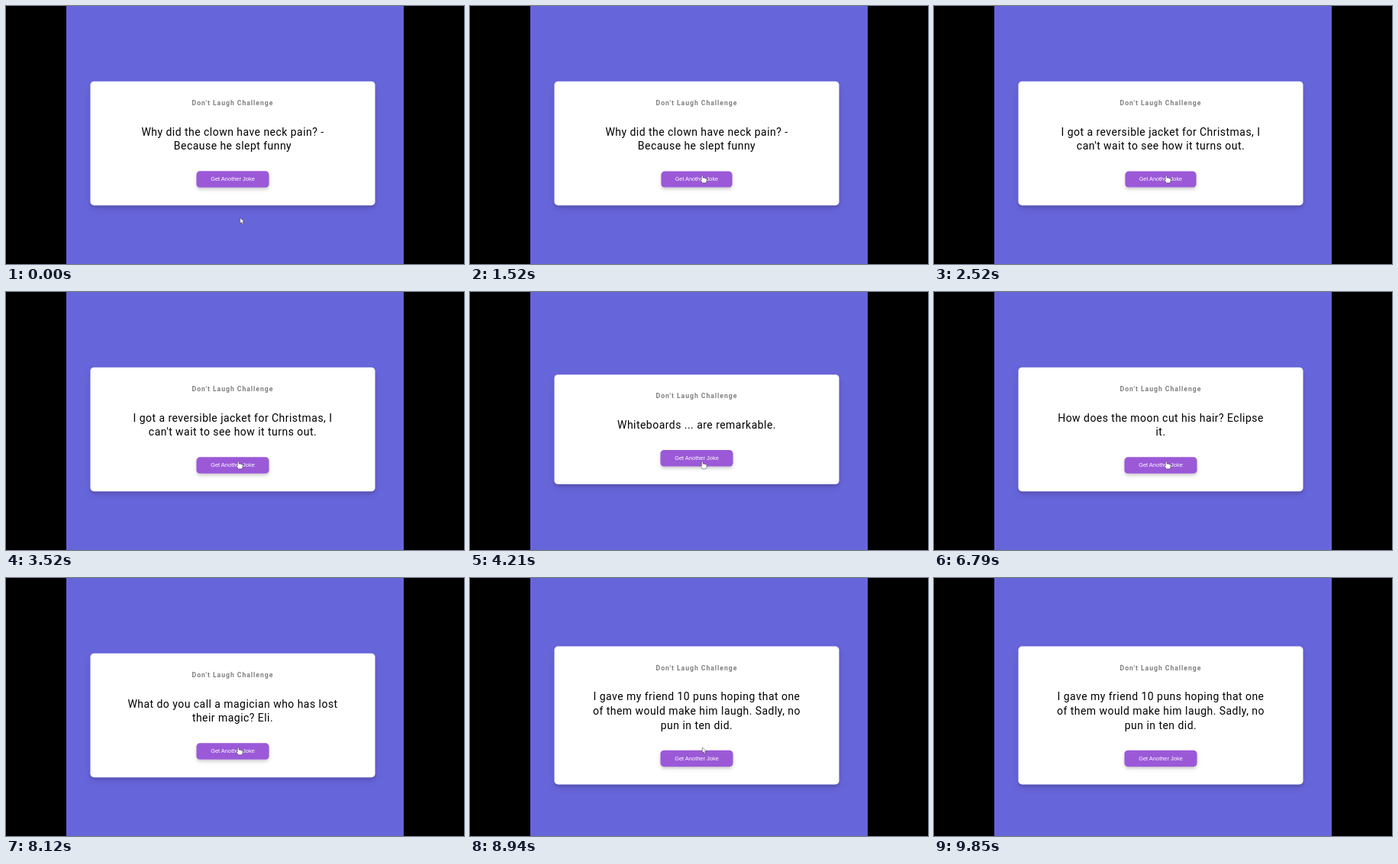
An HTML page for the animation above (9.88 s loop, 600 px wide and 338 px high).

```html
<!DOCTYPE html>
<html lang="en">
<head>
<meta charset="utf-8">
<title>Joke card</title>
<style>
  html, body { margin: 0; width: 100%; height: 100%; overflow: hidden; background: #000; }
  #page { position: absolute; left: 79px; top: 0; width: 442px; height: 338px; overflow: hidden; background: #6765da; }
  #card {
    position: absolute; left: 217.6px; top: 179.5px; width: 800px; padding: 50px 20px; box-sizing: border-box;
    transform: translate(-50%, -50%) scale(.4663);
    background: #fff; border-radius: 10px; text-align: center; font-family: Roboto, sans-serif;
    box-shadow: 0 10px 20px rgba(0, 0, 0, .1), 0 6px 6px rgba(0, 0, 0, .1);
  }
  h3 { margin: 0; font-size: 18.72px; line-height: 22px; letter-spacing: 2px; opacity: .5; }
  #joke { margin: 50px 0; font-size: 30px; line-height: 40px; letter-spacing: 1px; white-space: pre; }
  #button {
    display: inline-block; vertical-align: top; padding: 14px 40px; border-radius: 10px;
    background: #9b59d8; color: #fff; font: 16px/18px "Liberation Sans", Arial, sans-serif;
    box-shadow: 0 5px 15px rgba(0, 0, 0, .1), 0 6px 6px rgba(0, 0, 0, .1);
  }
  #cursor { position: absolute; left: 0; top: 0; overflow: visible; }
</style>
</head>
<body>
<div id="page">
  <div id="card">
    <h3>Don't Laugh Challenge</h3>
    <div id="joke"></div>
    <div id="button">Get Another Joke</div>
  </div>
</div>
<svg id="cursor" width="12" height="12" fill="#fff" stroke="#222" stroke-linejoin="round">
  <path id="arrow" transform="scale(.466)" d="M0 0V16L4 12.5L6.5 18.5L9.5 17.2L7 11.5H12Z"/>
  <path id="hand" transform="scale(.466)" d="M-2 1Q0-1 2 1V7Q4 5.500 6 7.500Q8 6.500 9.500 8.500Q12 7.500 12.500 10V15Q12 18 10 21H0Q-2 17-6 13Q-6 10-2 13Z"/>
</svg>
<script>
const LOOP = 9880;
const PRESS_LENGTH = 130;
const presses = [1440, 2440, 3690, 5130, 7380, 8350];
const jokes = [
  [0, "Why did the clown have neck pain? -\nBecause he slept funny"],
  [1850, "I got a reversible jacket for Christmas, I\ncan't wait to see how it turns out."],
  [4090, "Whiteboards ... are remarkable."],
  [5500, "How does the moon cut his hair? Eclipse\nit."],
  [7750, "What do you call a magician who has lost\ntheir magic? Eli."],
  [8700, "I gave my friend 10 puns hoping that one\nof them would make him laugh. Sadly, no\npun in ten did."]
];
const [joke, button, cursor, arrow, hand] =
  ["joke", "button", "cursor", "arrow", "hand"].map(id => document.getElementById(id));

const progress = (t, start, end) => Math.min(1, Math.max(0, (t - start) / (end - start)));
const smooth = p => p * p * (3 - 2 * p);

function draw(t) {
  const text = jokes.findLast(([start]) => t >= start)[1];
  if (joke.textContent !== text) joke.textContent = text;

  const pressed = presses.some(start => t >= start && t < start + PRESS_LENGTH);
  button.style.transform = pressed ? "scale(.98)" : "none";

  const enter = smooth(progress(t, 250, 950));
  const leave = progress(t, 9250, 9550) ** 2;
  const x = 306.7 - 2.4 * enter + 12 * leave;
  const y = 277.5 - 55.5 * enter - 160 * leave;
  const box = button.getBoundingClientRect();
  const hovering = y >= box.top && y <= box.bottom;
  cursor.style.transform = `translate(${x}px, ${y}px)`;
  cursor.style.display = leave < 1 ? "block" : "none";
  hand.style.display = hovering ? "block" : "none";
  arrow.style.display = hovering ? "none" : "block";
}

function tick() {
  draw(performance.now() % LOOP);
  requestAnimationFrame(tick);
}
tick();
</script>
</body>
</html>
```
